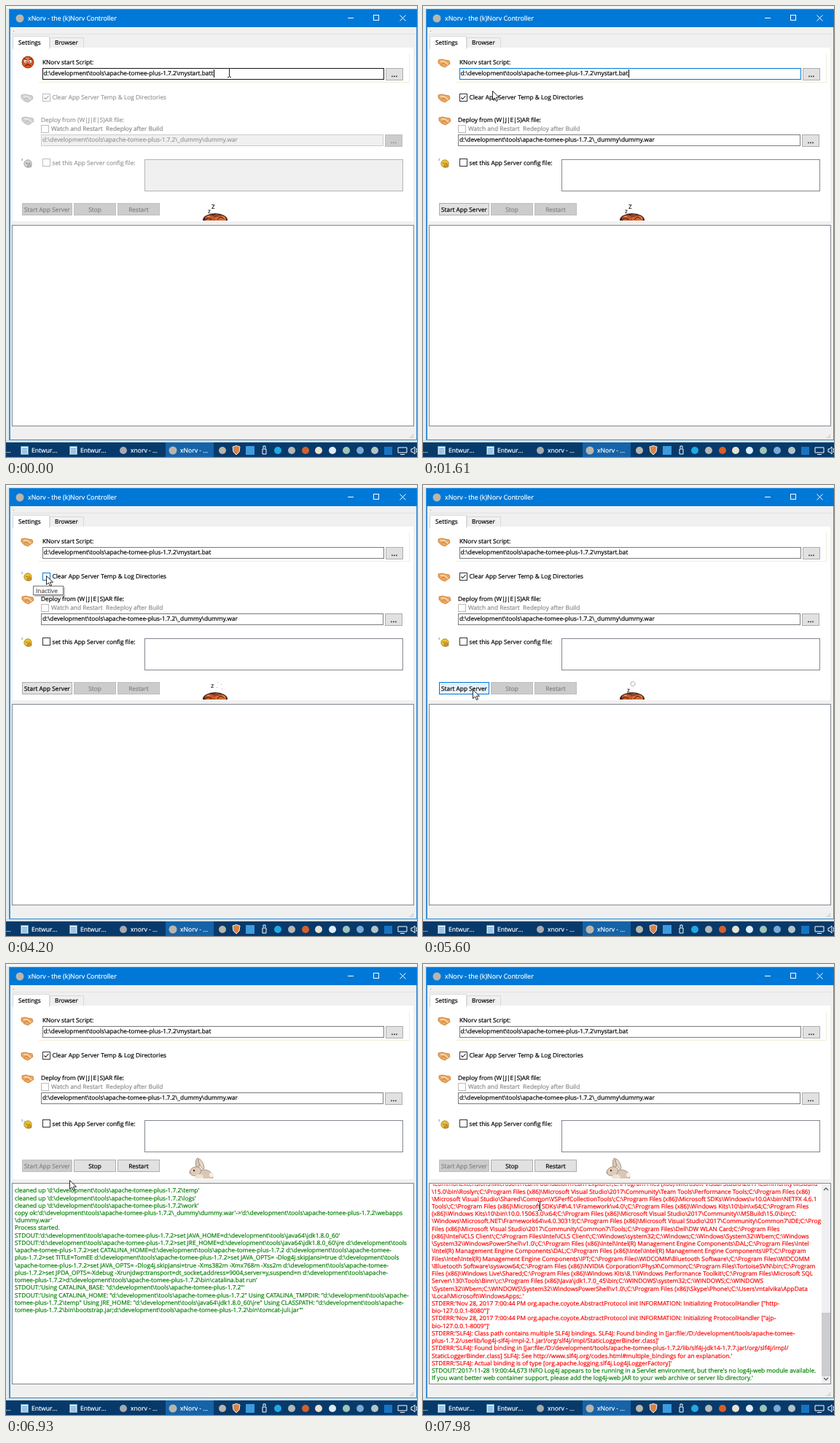
Animation of 564 by 618 pixels, one loop 8000 ms. Source, as an HTML page with a canvas:

```html
<!DOCTYPE html>
<html lang="en">
<head>
<meta charset="utf-8">
<title>Controller window</title>
<style>
html, body { margin: 0; width: 100%; height: 100%; overflow: hidden; background: #e4ecee; }
canvas { display: block; width: 564px; height: 618px; }
</style>
</head>
<body>
<canvas id="stage" width="564" height="618"></canvas>
<script>
const ctx = document.getElementById('stage').getContext('2d');
const LOOP = 8000, STEP = 70, ROW = 10.23;
const BLUE = '#0078d7', GREY = '#989898', GREEN = '#008000', RED = '#ff0000';
const UI = '"Open Sans", "Noto Sans", sans-serif';

// Key times in ms
const FIXED = 490, UNCHECK = 2450, TIP_ON = 3500, CHECK = 4620, START = 5880;

const HOME = 'd:\\development\\tools\\apache-tomee-plus-1.7.2';
const SCRIPT = HOME + '\\mystart.bat';
const WAR = HOME + '\\_dummy\\dummy.war';

const lines = text => text.trim().split('\n');

const started = lines(String.raw`
cleaned up 'd:\development\tools\apache-tomee-plus-1.7.2\temp'
cleaned up 'd:\development\tools\apache-tomee-plus-1.7.2\logs'
cleaned up 'd:\development\tools\apache-tomee-plus-1.7.2\work'
copy ok:'d:\development\tools\apache-tomee-plus-1.7.2\_dummy\dummy.war'->'d:\development\tools\apache-tomee-plus-1.7.2\webapps
\dummy.war'
Process started.
STDOUT:'d:\development\tools\apache-tomee-plus-1.7.2>set JAVA_HOME=d:\development\tools\java64\jdk1.8.0_60'
STDOUT:'d:\development\tools\apache-tomee-plus-1.7.2>set JRE_HOME=d:\development\tools\java64\jdk1.8.0_60\jre d:\development\tools
\apache-tomee-plus-1.7.2>set CATALINA_HOME=d:\development\tools\apache-tomee-plus-1.7.2 d:\development\tools\apache-tomee-
plus-1.7.2>set TITLE=TomEE d:\development\tools\apache-tomee-plus-1.7.2>set JAVA_OPTS= -Dlog4j.skipJansi=true d:\development\tools
\apache-tomee-plus-1.7.2>set JAVA_OPTS= -Dlog4j.skipJansi=true -Xms382m -Xmx768m -Xss2m d:\development\tools\apache-tomee-
plus-1.7.2>set JPDA_OPTS=-Xdebug -Xrunjdwp:transport=dt_socket,address=9004,server=y,suspend=n d:\development\tools\apache-
tomee-plus-1.7.2>d:\development\tools\apache-tomee-plus-1.7.2\bin\catalina.bat run'
STDOUT:'Using CATALINA_BASE: "d:\development\tools\apache-tomee-plus-1.7.2"'
STDOUT:'Using CATALINA_HOME: "d:\development\tools\apache-tomee-plus-1.7.2" Using CATALINA_TMPDIR: "d:\development\tools\apache-
tomee-plus-1.7.2\temp" Using JRE_HOME: "d:\development\tools\java64\jdk1.8.0_60\jre" Using CLASSPATH: "d:\development\tools\apache-
tomee-plus-1.7.2\bin\bootstrap.jar;d:\development\tools\apache-tomee-plus-1.7.2\bin\tomcat-juli.jar"'`);

const searchPath = lines(String.raw`
\CommonExtensions\Microsoft\TeamFoundation\Team Explorer;C:\Program Files (x86)\Microsoft Visual Studio\2017\Community\MSBuild
\15.0\bin\Roslyn;C:\Program Files (x86)\Microsoft Visual Studio\2017\Community\Team Tools\Performance Tools;C:\Program Files (x86)
\Microsoft Visual Studio\Shared\Common\VSPerfCollectionTools\;C:\Program Files (x86)\Microsoft SDKs\Windows\v10.0A\bin\NETFX 4.6.1
Tools\;C:\Program Files (x86)\Microsoft SDKs\F#\4.1\Framework\v4.0\;C:\Program Files (x86)\Windows Kits\10\bin\x64;C:\Program Files
(x86)\Windows Kits\10\bin\10.0.15063.0\x64;C:\Program Files (x86)\Microsoft Visual Studio\2017\Community\\MSBuild\15.0\bin;C:
\Windows\Microsoft.NET\Framework64\v4.0.30319;C:\Program Files (x86)\Microsoft Visual Studio\2017\Community\Common7\IDE;C:\Program
Files (x86)\Microsoft Visual Studio\2017\Community\Common7\Tools;C:\Program Files\Dell\DW WLAN Card;C:\Program Files
(x86)\Intel\iCLS Client\;C:\Program Files\Intel\iCLS Client\;C:\Windows\system32;C:\Windows;C:\Windows\System32\Wbem;C:\Windows
\System32\WindowsPowerShell\v1.0\;C:\Program Files (x86)\Intel\Intel(R) Management Engine Components\DAL;C:\Program Files\Intel
\Intel(R) Management Engine Components\DAL;C:\Program Files (x86)\Intel\Intel(R) Management Engine Components\IPT;C:\Program
Files\Intel\Intel(R) Management Engine Components\IPT;C:\Program Files\WIDCOMM\Bluetooth Software\;C:\Program Files\WIDCOMM
\Bluetooth Software\syswow64;C:\Program Files (x86)\NVIDIA Corporation\PhysX\Common;C:\Program Files\TortoiseSVN\bin;C:\Program
Files (x86)\Windows Live\Shared;C:\Program Files (x86)\Windows Kits\8.1\Windows Performance Toolkit\;C:\Program Files\Microsoft SQL
Server\130\Tools\Binn\;c:\Program Files (x86)\Java\jdk1.7.0_45\bin;C:\WINDOWS\system32;C:\WINDOWS;C:\WINDOWS
\System32\Wbem;C:\WINDOWS\System32\WindowsPowerShell\v1.0\;C:\Program Files (x86)\Skype\Phone\;C:\Users\mtalvika\AppData
\Local\Microsoft\WindowsApps;.'`);

const tail = lines(String.raw`
STDERR:'Nov 28, 2017 7:00:44 PM org.apache.coyote.AbstractProtocol init INFORMATION: Initializing ProtocolHandler ["http-
bio-127.0.0.1-8080"]'
STDERR:'Nov 28, 2017 7:00:44 PM org.apache.coyote.AbstractProtocol init INFORMATION: Initializing ProtocolHandler ["ajp-
bio-127.0.0.1-8009"]'
STDERR:'SLF4J: Class path contains multiple SLF4J bindings. SLF4J: Found binding in [jar:file:/D:/development/tools/apache-tomee-
plus-1.7.2/userlib/log4j-slf4j-impl-2.1.jar!/org/slf4j/impl/StaticLoggerBinder.class]'
STDERR:'SLF4J: Found binding in [jar:file:/D:/development/tools/apache-tomee-plus-1.7.2/lib/slf4j-jdk14-1.7.7.jar!/org/slf4j/impl/
StaticLoggerBinder.class] SLF4J: See http://www.slf4j.org/codes.html#multiple_bindings for an explanation.'
STDERR:'SLF4J: Actual binding is of type [org.apache.logging.slf4j.Log4jLoggerFactory]'
STDOUT:'2017-11-28 19:00:44,673 INFO Log4j appears to be running in a Servlet environment, but there's no log4j-web module available.
If you want better web container support, please add the log4j-web JAR to your web archive or server lib directory.'`);

const log = [...started, ...searchPath, ...searchPath, ...searchPath, ...tail];
const isGreen = i => i < started.length || i >= log.length - 2;

// [time, rows in the log]
const growth = [[5880, 3], [6090, 5], [6230, 6], [6370, 7], [6510, 13], [6720, 17],
  [7210, 33], [7280, 65], [7420, 67], [7490, 69], [7630, 71], [7700, 73], [7840, 74], [7910, 76]];

// [time, x, y] of the pointer
const route = [[0, 306, 91], [980, 306, 91], [1540, 95, 116], [1750, 95, 116], [2240, 55, 124],
  [4900, 55, 124], [5530, 68, 280], [6230, 68, 280], [6860, 87, 296], [7210, 87, 296], [7700, 160, 331]];

function pointerAt(t) {
  const i = route.findIndex(k => k[0] > t);
  if (i < 0) return route[route.length - 1].slice(1);
  const [t0, x0, y0] = route[i - 1], [t1, x1, y1] = route[i];
  const u = (t - t0) / (t1 - t0), e = u * u * (3 - 2 * u);
  return [Math.round(x0 + (x1 - x0) * e), Math.round(y0 + (y1 - y0) * e)];
}

function rect(x, y, w, h, fill) { ctx.fillStyle = fill; ctx.fillRect(x, y, w, h); }

function box(x, y, w, h, fill, border) {
  rect(x, y, w, h, border);
  rect(x + 1, y + 1, w - 2, h - 2, fill);
}

// A hairline stroke gives small text the weight of screen-hinted type.
function text(s, x, y, color = '#000', size = 8.3, align = 'left') {
  ctx.font = `${size}px ${UI}`;
  ctx.textAlign = align;
  ctx.fillStyle = ctx.strokeStyle = color;
  ctx.lineWidth = 0.2;
  ctx.fillText(s, x, y);
  ctx.strokeText(s, x, y);
}

function oval(x, y, rx, ry, fill, turn = 0, line) {
  ctx.beginPath();
  ctx.ellipse(x, y, rx, ry, turn, 0, 7);
  ctx.fillStyle = fill;
  ctx.fill();
  if (line) { ctx.strokeStyle = line; ctx.lineWidth = 0.8; ctx.stroke(); }
}

function path(points, color, width = 1, fill) {
  ctx.beginPath();
  points.forEach(([x, y]) => ctx.lineTo(x, y));
  if (fill) { ctx.closePath(); ctx.fillStyle = fill; ctx.fill(); }
  ctx.strokeStyle = color;
  ctx.lineWidth = width;
  ctx.stroke();
}

function button(label, x, y, w, on, hover, size = 8.3) {
  box(x, y, w, 17, hover ? '#e5f1fb' : on ? '#e1e1e1' : '#cccccc', hover ? BLUE : on ? '#adadad' : '#bfbfbf');
  text(label, x + w / 2, y + 11.5, on ? '#000' : '#838383', size, 'center');
}

function checkBox(x, y, ticked, on, hover) {
  const c = hover ? BLUE : on ? '#333' : '#bcbcbc';
  box(x, y, 11, 11, '#fff', c);
  if (ticked) path([[x + 2.5, y + 5.5], [x + 4.5, y + 7.5], [x + 8.5, y + 3]], on ? '#222' : GREY, 1.1);
}

function handshake(x, y, on) {
  const skin = on ? '#eda75e' : '#d2d2d2', edge = on ? '#b8702c' : '#aaa', pale = on ? '#fbe0b8' : '#ececec';
  path([[x - 8, y - 4], [x - 3, y - 5], [x + 1, y - 4], [x + 7, y - 3], [x + 8, y + 1],
    [x + 4, y + 4], [x + 1, y + 6], [x - 4, y + 4], [x - 8, y]], edge, 0.7, skin);
  path([[x - 5, y - 2], [x, y - 2], [x + 5, y + 2]], pale, 1.5);
  path([[x - 4, y + 2], [x, y], [x + 3, y + 3]], edge, 0.7);
}

function sleeper(x, y, on, t) {
  const b = Math.floor(t / 350) % 2;
  oval(x + 1, y + 1, 5.2, 5.2, on ? '#eac233' : '#d4d4d4', 0, on ? '#a5801c' : GREY);
  path([[x - 2, y], [x, y + 1], [x + 1, y]], '#6d5515', 0.7);
  path([[x + 2, y], [x + 4, y + 1]], '#6d5515', 0.7);
  oval(x + 3, y + 4, 3, 2, on ? '#dd9a35' : '#bbb', 0, on ? '#95661c' : GREY);
  text('z', x - 8, y - 3, '#999', 5);
  if (b) text('z', x - 5, y - 1, '#aaa', 5);
}

function angryFace(x, y) {
  oval(x, y, 8, 8, '#d9531e', 0, '#7a2c10');
  oval(x - 1, y - 3, 5, 3, '#ec8045');
  oval(x - 3, y - 1, 2, 2.2, '#fff');
  oval(x + 3, y - 1, 2, 2.2, '#fff');
  oval(x - 2.5, y - 0.5, 0.9, 1, '#222');
  oval(x + 2.5, y - 0.5, 0.9, 1, '#222');
  path([[x - 6, y - 5], [x - 1, y - 3]], '#4d1708');
  path([[x + 6, y - 5], [x + 1, y - 3]], '#4d1708');
  path([[x - 4, y + 5], [x, y + 3], [x + 4, y + 5]], '#4d1708');
}

function sleepingPet(t) {
  const p = (t % 1190) / 1190;
  oval(287, 293, 17, 9, '#40281e');
  oval(280, 291, 7, 4.6, '#c4562a');
  oval(294, 292, 8, 5, '#d8672f');
  oval(289, 287, 4, 2, '#8c452c');
  oval(278, 289, 2, 1, '#eda06a');
  oval(298, 290, 2, 1, '#f1a269');
  path([[274, 292], [278, 290], [282, 293]], '#241510');
  path([[290, 293], [294, 289], [299, 291]], '#241510');
  if (p < 0.45) {
    text('z', 277, 284, '#111', 8);
    text('Z', 282, 278, '#111', 8);
  } else if (p < 0.65) {
    text('z', 281, 278, '#222', 9);
    for (const [x, y] of [[290, 270], [295, 273], [289, 277], [296, 279]]) rect(x, y, 1, 1, '#b0b0b0');
  } else {
    text('z', 280, 284, '#111', 8);
    ctx.setLineDash([1, 1]);
    ctx.beginPath();
    ctx.arc(288, 272.5, 3, 0, 7);
    ctx.strokeStyle = '#555';
    ctx.lineWidth = 1;
    ctx.stroke();
    ctx.setLineDash([]);
  }
}

function rabbit(t) {
  const lean = Math.floor(t / 140) % 2 * 0.1, fur = '#d9c6b4', edge = '#95806f';
  oval(263, 273, 2.6, 7, fur, 0.1 - lean, edge);
  oval(268, 274, 2.4, 7.5, '#e6d8ca', -0.35 - lean, edge);
  oval(273, 290, 11, 8, fur, 0.2, edge);
  oval(260, 284, 8, 6, '#dfcbb9', -0.3, edge);
  oval(282, 289, 3, 3, '#f6efe8');
  oval(265, 292, 6, 4, '#eee2d7');
  oval(258, 283, 1.1, 1.3, '#33271f');
  oval(252.5, 286, 1, 0.8, '#a06e66');
}

function pointer(x, y) {
  const beam = (x > 50 && x < 519 && y > 85 && y < 102) || (x > 48 && x < 518 && y > 176 && y < 193) || y > 301;
  if (beam) {
    rect(x, y - 5, 1, 11, '#222');
    rect(x - 2, y - 6, 2, 1, '#222'); rect(x + 1, y - 6, 2, 1, '#222');
    rect(x - 2, y + 6, 2, 1, '#222'); rect(x + 1, y + 6, 2, 1, '#222');
    return;
  }
  const shape = [[0, 0], [0, 12], [3, 9.5], [5, 14], [7, 13], [5, 8.7], [9, 8.7]];
  path(shape.map(([a, b]) => [x + a + 0.5, y + b + 0.5]), '#111', 0.9, '#fff');
}

function frame() {
  rect(0, 0, 564, 618, '#e4ecee');
  rect(0, 0, 564, 3, '#f4f7f7');
  rect(4, 4, 560, 591, '#3c8fd2');
  rect(6, 29, 557, 565, '#f0f0f0');
  rect(5, 5, 559, 24, BLUE);
  oval(19, 17, 5.5, 5.5, '#b9b5ab');
  text('xNorv - the (k)Norv Controller', 30, 20.3, '#fff', 8.9);
  rect(469, 16, 8, 1, '#fff');
  box(504, 12, 8, 8, BLUE, '#fff');
  path([[540.5, 12.5], [548.5, 20.5]], '#fff');
  path([[548.5, 12.5], [540.5, 20.5]], '#fff');
  rect(10, 34, 1, 1, '#888');
  rect(6, 38, 557, 1, '#e3e3e3');
  box(60, 43, 47, 15, '#f0f0f0', '#d9d9d9');
  rect(9, 57, 550, 238, '#fff');
  box(9, 41, 51, 18, '#fff', '#d9d9d9');
  rect(10, 56, 49, 4, '#fff');
  text('Settings', 17, 52.8);
  text('Browser', 67, 53);
  rect(45, 104, 508, 1, '#f4eed6');
  rect(553, 65, 1, 40, '#f4eed6');
  for (let i = 0; i < 3; i++)
    for (let j = 0; j <= i; j++) rect(558 - j * 2, 587 + i * 2, 1, 1, '#a5a5a5');
}

function taskbar() {
  rect(0, 595, 564, 3, '#d4dfe4');
  rect(0, 598, 564, 20, '#073a6b');
  rect(219, 598, 66, 20, '#1663a8');
  text('...', 0, 612, '#fff', 8.5);
  for (const x of [20, 87]) {
    box(x, 603, 11, 12, '#d8ecf8', '#6f9dbd');
    for (let i = 0; i < 4; i++) rect(x + 2, 606 + i * 2, 7, 1, '#5f9fcd');
    text('Entwur...', x + 15, 612.3, '#fff', 8.6);
  }
  oval(161, 609, 5, 5, '#a7aab0');
  text('xnorv - ...', 171, 612.3, '#fff', 8.6);
  oval(229, 609, 5.5, 5.5, '#b9b5ab');
  text('xNorv - ...', 239, 612.3, '#fff', 8.6);
  const dots = [[297, '#b9b5ab'], [373, '#20a9e6'], [392, '#b7b7b4'], [411, '#d5602b'], [429, '#e8e2d0'],
    [448, '#dcecf8'], [467, '#9fc5b5'], [486, '#7ca9d4'], [506, '#b4c3c6']];
  for (const [x, c] of dots) oval(x, 609, 5, 5, c);
  path([[311, 604], [316, 602.5], [321, 604], [320, 611], [316, 615], [312, 611]], '#eee', 1, '#d98345');
  rect(329, 603, 12, 12, '#3d9be0');
  rect(519, 604, 11, 11, '#1674c5');
  path([[352, 607], [357, 607], [357, 614], [352, 614], [352, 607]], '#fff');
  path([[353, 606], [353, 603], [356, 603], [356, 606]], '#fff');
  path([[538, 605], [550, 605], [550, 612], [538, 612], [538, 605]], '#fff');
  path([[541, 614.5], [547, 614.5]], '#fff');
  path([[556, 607], [558, 607], [561, 604], [561, 614], [558, 611], [556, 611], [556, 607]], '#fff');
  path([[563, 606], [564, 609], [563, 612]], '#fff');
}

function form(t, mx, my) {
  const on = t >= FIXED, running = t >= START, focus = t < UNCHECK;
  const ticked = t < UNCHECK || t >= CHECK;
  const ink = on ? '#000' : GREY, shade = on ? '#fff' : '#f0f0f0';
  const over = (x, y, w, h) => mx >= x && mx < x + w && my >= y && my < y + h;

  if (on) handshake(29, 78, true); else angryFace(30, 77);
  text('KNorv start Script:', 50, 80);
  box(50, 85, 469, 16, '#fff', over(50, 85, 469, 16) ? '#171717' : focus ? BLUE : '#7a7a7a');
  const script = SCRIPT + (on ? '' : 't');
  text(script, 51.5, 95.2);
  const blink = Math.floor((on ? t - FIXED : t) / 530) % 2 === 0;
  if (focus && blink) rect(Math.round(52 + ctx.measureText(script).width), 87, 1, 11, '#000');
  button('...', 521, 85, 24, true, false, 11);

  if (ticked) handshake(29, 126, on); else sleeper(29, 125, true, t);
  checkBox(50, 120, ticked, on, over(50, 119, 170, 12));
  text('Clear App Server Temp & Log Directories', 63.5, 128.2, ink);

  handshake(30, 157, on);
  text('Deploy from (W|J|E|S)AR file:', 48, 158.6, ink);
  checkBox(48, 163, false, false);
  text('Watch and Restart  Redeploy after Build', 62, 171.2, '#8c8c8c');
  box(48, 176, 470, 16, shade, !on ? '#ccc' : over(48, 176, 470, 16) ? '#171717' : '#7a7a7a');
  text(WAR, 50, 186.4, ink);
  button('...', 520, 176, 24, on, false, 11);

  const d = running ? 4 : 0;
  sleeper(29, 215 + d, on, t);
  checkBox(50, 209 + d, false, on);
  text('set this App Server config file:', 63.5, 218 + d, ink);
  box(190, 210 + d, 355, 44, shade, on ? '#828790' : '#b4b4b4');

  const by = running ? 268 : 270;
  button('Start App Server', 22, by, 69, on && !running, on && !running && over(22, by, 69, 17));
  button('Stop', 93, by, 58, running);
  button('Restart', 153, by, 58, running);

  ctx.save();
  ctx.beginPath();
  ctx.rect(240, 260, 80, 34);
  ctx.clip();
  if (running) rabbit(t); else sleepingPet(t);
  ctx.restore();
}

function output(t) {
  box(8, 300, 552, 276, '#fff', '#828790');
  const rows = growth.reduce((n, [at, k]) => t >= at ? k : n, 0);
  const full = rows > 26;
  ctx.save();
  ctx.beginPath();
  ctx.rect(10, 302, 549, 273);
  ctx.clip();
  const top = full ? 570.3 - (rows - 1) * ROW : 313.3;
  for (let i = Math.max(0, rows - 28); i < rows; i++)
    text(log[i], 12, top + i * ROW, isGreen(i) ? GREEN : RED);
  if (full) {
    const size = 250 * 26.5 / rows;
    rect(547, 302, 12, 273, '#f0f0f0');
    rect(547, 565 - size, 12, size, '#cdcdcd');
    path([[550, 310], [553, 307], [556, 310]], '#555', 1.2);
    path([[550, 567], [553, 570], [556, 567]], '#555', 1.2);
  }
  ctx.restore();
}

function tooltip() {
  rect(39, 140, 42, 13, 'rgba(0,0,0,.22)');
  box(37, 138, 42, 13, '#fff', '#767676');
  text('Inactive', 41, 147.8, '#575757');
}

function draw(now) {
  const t = Math.floor(now % LOOP / STEP) * STEP;
  const [mx, my] = pointerAt(t);
  ctx.textRendering = 'geometricPrecision';
  ctx.lineJoin = 'round';
  frame();
  form(t, mx, my);
  output(t);
  taskbar();
  if (t >= TIP_ON && t < CHECK) tooltip();
  pointer(mx, my);
}

const begin = performance.now();
function tick() {
  draw(performance.now() - begin);
  requestAnimationFrame(tick);
}
tick();
</script>
</body>
</html>
```
